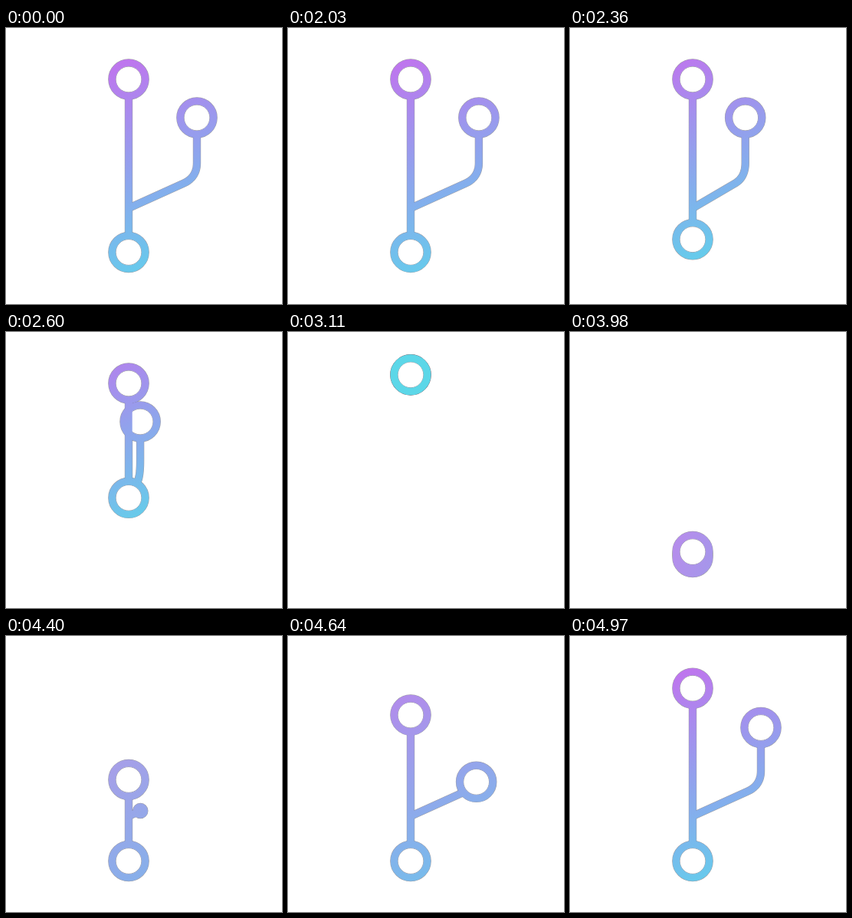
Recreate the animation shown at these times as an HTML page with a canvas. Size 360x360 px, loop 5000 ms.

```html
<!DOCTYPE html>
<html lang="en">
<head>
<meta charset="utf-8">
<title>Branch loader</title>
<style>
html, body { margin: 0; width: 100%; height: 100%; overflow: hidden; background: #fff; }
canvas { display: block; width: 100vw; height: 100vh; }
</style>
</head>
<body>
<canvas id="stage" width="360" height="360"></canvas>
<script>
const ctx = document.getElementById('stage').getContext('2d');
const LOOP = 5000, X = 160, TOP = 67, FORK_X = 249, FORK_Y = 117, JOINT = 235, BASE = 292.5;
const RADIUS = 21.6, RING = 9.4, LINE = 9.4;
const EDGE = 'rgba(60,60,75,0.5)';
const PURPLE = [193, 115, 238], SKY = [100, 205, 236], CYAN = [92, 215, 232];
const LILAC = [184, 140, 236], PERIWINKLE = [168, 158, 232], HAZE = [152, 158, 233];

const clamp = v => Math.max(0, Math.min(1, v));
const span = (t, a, b) => clamp((t - a) / (b - a));
const lerp = (a, b, p) => a + (b - a) * p;
const mix = (a, b, p) => a.map((v, i) => lerp(v, b[i], p));
const css = c => `rgb(${c.map(Math.round).join(',')})`;

// cubic-bezier(x1, 0, x2, 1)
function ease(u, x1, x2) {
  let lo = 0, hi = 1;
  for (let i = 0; i < 24; i++) {
    const s = (lo + hi) / 2, r = 1 - s;
    if (3 * r * r * s * x1 + 3 * r * s * s * x2 + s * s * s < u) lo = s; else hi = s;
  }
  return lo * lo * (3 - 2 * lo);
}

// Side branch as a polyline from the trunk up to its ring
function branchPoints(x, y, joint) {
  const kneeX = X + (x - X) * 73 / 89, pts = [[X, joint]];
  for (let i = 0; i <= 12; i++) {
    const s = i / 12, r = 1 - s;
    pts.push([
      r * r * kneeX + 2 * r * s * x + s * s * x,
      Math.max(y, r * r * (joint - 33) + 2 * r * s * (joint - 41) + s * s * (joint - 59))
    ]);
  }
  pts.push([x, y]);
  return pts;
}

function trim(pts, part) {
  const len = i => Math.hypot(pts[i][0] - pts[i - 1][0], pts[i][1] - pts[i - 1][1]);
  let left = 0;
  for (let i = 1; i < pts.length; i++) left += len(i);
  left *= part;
  const out = [pts[0]];
  for (let i = 1; i < pts.length; i++) {
    const d = len(i);
    if (d >= left) {
      out.push(mix(pts[i - 1], pts[i], d ? left / d : 0));
      break;
    }
    out.push(pts[i]);
    left -= d;
  }
  return out;
}

function pose(t) {
  const s = { x: X, top: TOP, base: BASE, fork: null, c1: PURPLE, c2: SKY, lead: 'base' };
  if (t < 2000) {
    s.fork = { pts: branchPoints(FORK_X, FORK_Y, JOINT), r: 1 };
  } else if (t < 3620) {
    // collapse upwards, then dash off to the lower right
    s.base = lerp(BASE, 50.2, ease(span(t, 2000, 3330), 0.73, 0.3));
    s.top = Math.min(TOP, s.base);
    const fx = lerp(FORK_X, X, ease(span(t, 2000, 2890), 0.67, 0.4));
    const fy = Math.min(FORK_Y, s.base);
    if (t < 3000) s.fork = { pts: branchPoints(fx, fy, Math.min(JOINT, s.base + 10)), r: 1 };
    const p = span(t, 2000, 3100);
    s.c1 = mix(PURPLE, CYAN, p ** 3);
    s.c2 = mix(SKY, CYAN, p);
    if (t > 3330) {
      const k = ((t - 3330) / 260) ** 3;
      s.x += 169.5 * k;
      s.base += 232 * k;
      s.top = s.base;
    }
  } else {
    // dash in from the upper left, then grow again
    const k = (Math.max(0, 3910 - t) / 260) ** 3;
    s.x -= 122.5 * k;
    s.base = 293.5 - 255 * k;
    s.top = s.base - 226.5 * ease(span(t, 3770, 5065), 0.6, 0.4);
    s.lead = 'top';
    const p = ease(span(t, 4150, 5080), 0.6, 0.4);
    if (s.top < JOINT) {
      s.fork = { pts: trim(branchPoints(FORK_X, FORK_Y, JOINT), p), r: clamp(p * 2.4) };
    }
    s.c1 = mix(mix(LILAC, PERIWINKLE, span(t, 3980, 4400)), PURPLE, span(t, 4400, 4950));
    s.c2 = mix(HAZE, SKY, span(t, 3980, 4950));
  }
  return s;
}

function stroke(pts, width, paint) {
  ctx.beginPath();
  pts.forEach(p => ctx.lineTo(p[0], p[1]));
  ctx.lineWidth = width;
  ctx.strokeStyle = paint;
  ctx.stroke();
}

function circle(x, y, r, width, paint) {
  ctx.beginPath();
  ctx.arc(x, y, Math.max(0.1, r), 0, Math.PI * 2);
  ctx.lineWidth = width;
  ctx.strokeStyle = paint;
  ctx.stroke();
}

function ring(x, y, scale, paint) {
  const r = RADIUS * scale, hole = r - RING / 2;
  ctx.beginPath();
  ctx.arc(x, y, r, 0, Math.PI * 2);
  ctx.fillStyle = '#fff';
  ctx.fill();
  if (hole > 0) circle(x, y, hole, 1, EDGE);
  circle(x, y, r, RING, paint);
}

function draw(t) {
  const s = pose(t);
  ctx.fillStyle = '#fff';
  ctx.fillRect(0, 0, 360, 360);
  ctx.lineJoin = 'round';

  const fill = ctx.createLinearGradient(s.x - 26, s.top - 26, s.x + 75, s.base + 12);
  fill.addColorStop(0, css(s.c1));
  fill.addColorStop(1, css(s.c2));

  const trunk = [[s.x, s.top], [s.x, s.base]];
  const tip = s.fork && s.fork.pts[s.fork.pts.length - 1];

  // soft dark rim under everything
  stroke(trunk, LINE + 1, EDGE);
  circle(s.x, s.top, RADIUS, RING + 1, EDGE);
  circle(s.x, s.base, RADIUS, RING + 1, EDGE);
  if (tip) {
    stroke(s.fork.pts, LINE + 1, EDGE);
    circle(tip[0], tip[1], RADIUS * s.fork.r, RING + 1, EDGE);
    stroke(s.fork.pts, LINE, fill);
    ring(tip[0], tip[1], s.fork.r, fill);
  }
  stroke(trunk, LINE, fill);
  const order = s.lead === 'top' ? [s.base, s.top] : [s.top, s.base];
  order.forEach(y => ring(s.x, y, 1, fill));
}

const start = performance.now();
function tick() {
  draw((performance.now() - start) % LOOP);
  requestAnimationFrame(tick);
}
tick();
</script>
</body>
</html>
```
